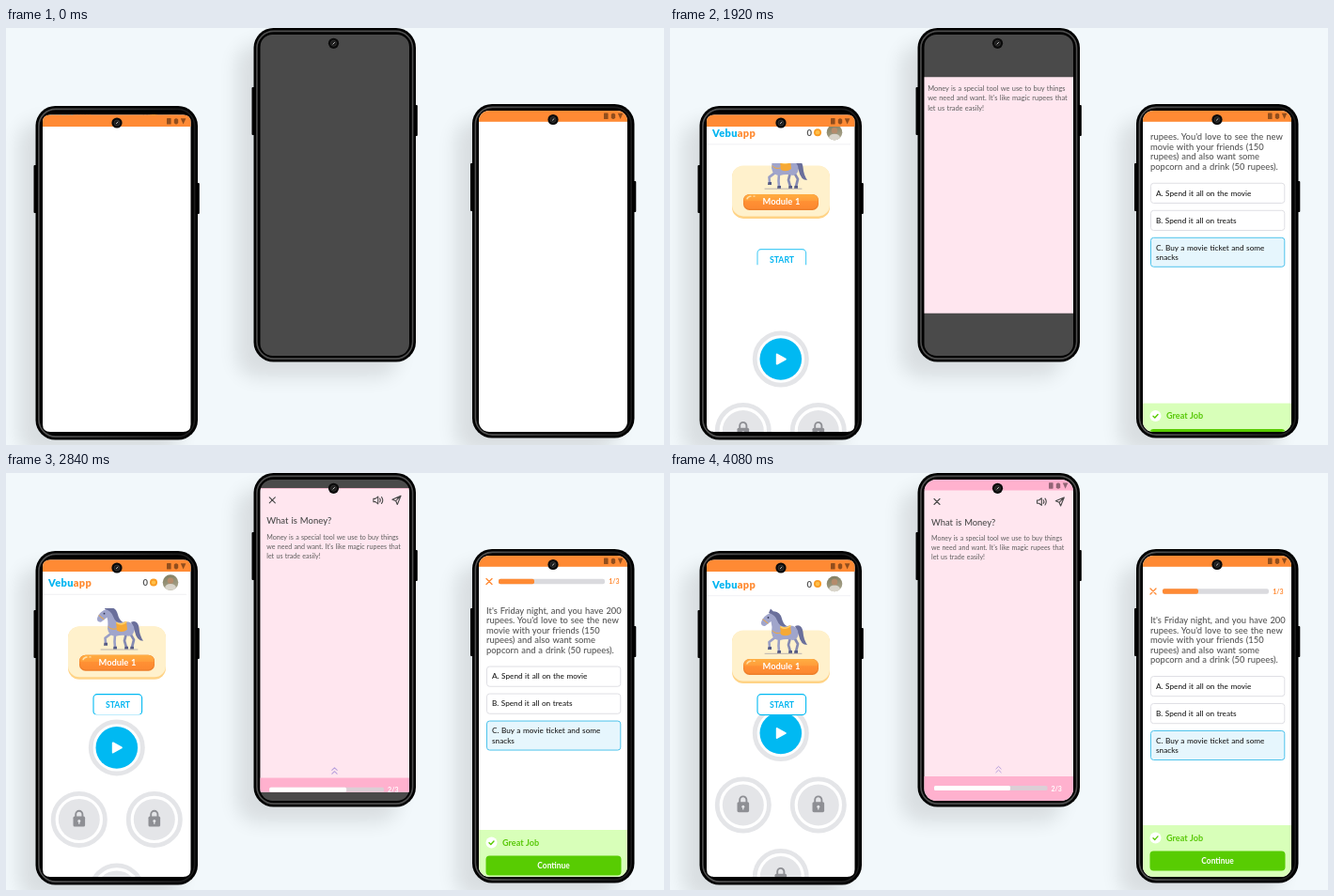
These frames come from a looping animation (700 px wide and 444 px high, 5.04 s). An HTML page:

```html
<!DOCTYPE html>
<html lang="en">
<head>
<meta charset="utf-8">
<title>Learning app screens</title>
<style>
  html, body { margin: 0; width: 100%; height: 100%; overflow: hidden; background: #f2f8fb; }
  svg { display: block; width: 700px; height: 444px; }
  text { font-family: Lato, "Open Sans", sans-serif; word-spacing: .06em; }
  .bold { font-weight: 700; }
  .logo { font-size: 11px; font-weight: 900; letter-spacing: .35px; }
  .line { fill: none; stroke-linecap: round; stroke-linejoin: round; }
  .shadow { fill: #000; opacity: .1; filter: url(#soft); }
</style>
</head>
<body>
<svg viewBox="0 0 700 444" xmlns="http://www.w3.org/2000/svg">
  <defs>
    <filter id="soft" x="-30%" y="-20%" width="160%" height="140%"><feGaussianBlur stdDeviation="10"/></filter>
    <linearGradient id="rim"><stop offset=".1" stop-color="#505050"/><stop offset=".9" stop-color="#1c1c1c"/></linearGradient>
    <linearGradient id="pill" x2="0" y2="1">
      <stop offset="0" stop-color="#ffae42"/><stop offset=".45" stop-color="#ff9d3a"/>
      <stop offset=".5" stop-color="#ff9034"/><stop offset="1" stop-color="#fc8830"/>
    </linearGradient>
    <linearGradient id="photo" x2=".3" y2="1">
      <stop offset="0" stop-color="#7d7a5c"/><stop offset="1" stop-color="#a9a48c"/>
    </linearGradient>
    <clipPath id="leftScreen"><path d="M39 105V100Q39 92.500 47 92.500H188.500Q196.500 92.500 196.500 100V422Q196.500 430 188.500 430H47Q39 430 39 422Z"/></clipPath>
    <clipPath id="midScreen"><rect x="270.500" y="7" width="158.500" height="342" rx="13"/></clipPath>
    <clipPath id="rightScreen"><rect x="503" y="88" width="158" height="342" rx="11"/></clipPath>
    <clipPath id="cardClip"><rect x="39" y="144" width="158" height="90"/></clipPath>
    <clipPath id="startClip"><rect id="startMask" x="90" y="235" width="58" height="0"/></clipPath>
    <clipPath id="pageClip"><rect id="pageMask" x="270" y="178" width="160" height="0"/></clipPath>
    <clipPath id="quizClip"><rect x="503" y="112" width="158" height="200"/></clipPath>

    <g id="status" fill="#000" opacity=".43">
      <rect width="4.600" height="6.500" rx=".6"/>
      <path d="M7.800 1.500Q10 -1 12.200 1.500V5Q10 8 7.800 5Z"/>
      <path d="M14.800 .3H20.400L17.600 6.500Z"/>
    </g>
    <g id="camera">
      <circle r="5.600" fill="#0a0a0a"/>
      <circle r="3" fill="#1b1b1b" stroke="#3c3c3c" stroke-width=".7"/>
      <path class="line" d="M-.6 .7L1 -.8" stroke="#ddd" stroke-width=".9"/>
    </g>
    <g id="cross"><path class="line" d="M-3 -3L3 3M3 -3L-3 3"/></g>
    <g id="ring"><circle r="27.600" fill="#fff" stroke="#e4e5e8" stroke-width="4.800"/></g>
    <g id="lock">
      <use href="#ring"/>
      <circle r="22" fill="#e4e5e8"/>
      <path class="line" d="M-3.600 -3V-5.500A3.600 3.600 0 0 1 3.600 -5.500V-3" stroke="#8e8f94" stroke-width="1.900"/>
      <rect x="-6.300" y="-3.300" width="12.600" height="11" rx="1.600" fill="#8e8f94"/>
      <circle cy="1.700" r="1.500" fill="#e4e5e8"/>
      <rect x="-.6" y="2" width="1.200" height="3" fill="#e4e5e8"/>
    </g>
    <g id="horse">
      <path d="M133 163Q140 160 141.500 169Q142 177 146 183Q139 183 137 173Z" fill="#6a6f9b"/>
      <path class="line" d="M132 175L136 182L134 190M128 175L126 183L128 190" stroke="#858ab2" stroke-width="2.700"/>
      <path class="line" d="M112 175L105.500 180L106 186M116 176L115.500 184L116 190" stroke="#9a9fc6" stroke-width="2.600"/>
      <path d="M107 149Q113 145 116 152Q118 160 124 163Q133 161 136 168Q138 176 131 178Q124 176 117 178Q109 178 108 170Q109 163 107.500 158L101 163Q96.500 163 97 159Q99 152 107 149Z" fill="#a0a5cb"/>
      <path d="M105 149L107 144.500L110 147.500Q117 147 119 155Q120 160 124 163Q117 165 114 157Q112 151 105 149Z" fill="#6a6f9b"/>
      <path d="M117 163Q122 166 128 162L129 171Q124 175 118 172Z" fill="#f6a935"/>
      <path class="line" d="M118 164Q123 167 128 163" stroke="#ffd16a" stroke-width="1.500"/>
      <path class="line" d="M109 168Q112 172 118 170M99 156L104 160" stroke="#f6a935" stroke-width="1"/>
      <circle cx="104.500" cy="154" r=".9" fill="#343858"/>
      <path d="M104.500 185H108V188H104ZM114.500 189H118V192H114ZM126.500 189H130V192H126ZM132.500 189H136V192H132Z" fill="#555a84"/>
      <path class="line" d="M101 192.300H140" stroke="#b9b3ae" stroke-width="1"/>
    </g>
  </defs>

  <g id="bodies"></g>

  <!-- left: course map -->
  <g clip-path="url(#leftScreen)">
    <rect x="39" y="92" width="158" height="339" fill="#fff"/>
    <g id="header">
      <text class="logo" x="45" y="122.700" fill="#00b4f0">Vebu<tspan fill="#ff8b33">app</tspan></text>
      <text class="bold" x="145.500" y="121.500" font-size="9.500" fill="#555">0</text>
      <circle cx="157" cy="118" r="4" fill="#f99b22"/>
      <circle cx="157" cy="118" r="2.200" fill="#ffc04a"/>
      <circle cx="175" cy="118" r="8.300" fill="url(#photo)"/>
      <path d="M169 123.700Q170 119.500 175 119.500Q180 119.500 181 123.700A8.300 8.300 0 0 1 169 123.700Z" fill="#d9d5cb"/>
      <circle cx="175" cy="116" r="3.200" fill="#b58c6c"/>
      <path d="M39 130.700H192" stroke="#ececf0" stroke-width=".8"/>
    </g>
    <g clip-path="url(#cardClip)">
      <g id="card">
        <rect x="66" y="168" width="104" height="56" rx="12" fill="#ffd386"/>
        <rect x="66" y="167.500" width="104" height="54" rx="12" fill="#fff1cc"/>
        <use href="#horse"/>
        <rect x="78" y="198" width="80" height="17" rx="6.500" fill="#ee7f2a"/>
        <rect x="78.500" y="198" width="79" height="15.500" rx="6.500" fill="url(#pill)"/>
        <path class="line" d="M82 203Q83 200.500 86 200.300M89 200.200H90" stroke="#ffe0a8" stroke-width="1.400"/>
        <text class="bold" x="118.500" y="209" font-size="9.300" fill="#fff" text-anchor="middle">Module 1</text>
      </g>
    </g>
    <g id="path">
      <g transform="translate(117.800 277)">
        <use href="#ring"/>
        <circle r="22.300" fill="#00b9f2"/>
        <path d="M-4 -5L5 0L-4 5Z" fill="#fff" stroke="#fff" stroke-width="2" stroke-linejoin="round"/>
      </g>
      <use href="#lock" x="77.800" y="353.500"/>
      <use href="#lock" x="157.800" y="353.500"/>
      <use href="#lock" x="117.800" y="430"/>
    </g>
    <g clip-path="url(#startClip)">
      <rect x="93" y="235.600" width="51.600" height="22" rx="4" fill="#fff"/>
      <rect id="startEdge" x="93" y="235.600" width="51.600" height="22" rx="4" fill="none" stroke="#00b9f2" stroke-width="1.100"/>
      <text class="bold" x="119" y="249.700" font-size="8.700" fill="#00b4f0" text-anchor="middle">START</text>
    </g>
    <rect x="39" y="92" width="158" height="13" fill="#ff8a34"/>
    <use href="#status" x="171" y="96"/>
  </g>
  <use href="#camera" x="118" y="101"/>

  <!-- middle: lesson page -->
  <g clip-path="url(#midScreen)">
    <rect x="270" y="6" width="160" height="344" fill="#4a4a4a"/>
    <g clip-path="url(#pageClip)">
      <g id="page">
        <rect x="270" y="6" width="160" height="344" fill="#ffe6ef"/>
        <rect x="270" y="6" width="160" height="12.500" fill="#ffb1ce"/>
        <use href="#status" x="403" y="10.200"/>
        <g class="line" stroke="#4a4a4a" stroke-width="1.100">
          <use href="#cross" x="284" y="30.500"/>
          <path d="M390.500 29H392.500L395.300 26.800V34.400L392.500 32.200H390.500ZM397.200 28.800Q398.500 30.600 397.200 32.400M399 27.200Q401.500 30.600 399 34"/>
          <path d="M419.300 26L410.300 29.800L414 31.300L415.600 35ZM414 31.300L419.300 26"/>
        </g>
        <text x="278" y="55.500" font-size="9.400" font-weight="500" fill="#4a4a4a">What is Money?</text>
        <g id="lesson" font-size="7.050" fill="#5e5e5e"></g>
        <path class="line" d="M346.800 315L349.500 312.400L352.200 315M346.800 318.800L349.500 316.200L352.200 318.800" stroke="#b79fdd" stroke-width="1"/>
        <rect x="270" y="323" width="160" height="27" fill="#ffb1ce"/>
        <rect x="281" y="333" width="120.500" height="5" rx="1.500" fill="#dccfd6"/>
        <rect x="281" y="333" width="81" height="5" rx="1.500" fill="#fff"/>
        <text class="bold" x="405.500" y="338.500" font-size="7" fill="#fff">2/3</text>
      </g>
    </g>
  </g>
  <use href="#camera" x="348.500" y="16.300"/>

  <!-- right: quiz -->
  <g clip-path="url(#rightScreen)">
    <rect x="503" y="87" width="158" height="344" fill="#fff"/>
    <g clip-path="url(#quizClip)">
      <g id="quiz">
        <g stroke="#ff8a34" stroke-width="1.300"><use href="#cross" x="514" y="126"/></g>
        <rect x="524" y="123.300" width="113" height="5.400" rx="2" fill="#dadade"/>
        <rect x="524" y="123.300" width="38" height="5.400" rx="2" fill="#ff8a34"/>
        <text class="bold" x="641.300" y="128.600" font-size="7" fill="#ff8a34">1/3</text>
        <g id="question" font-size="9.400" font-weight="500" fill="#555"></g>
        <g fill="#fff" stroke="#dfdfe4" stroke-width="1">
          <rect x="511.500" y="216.500" width="142.300" height="21.200" rx="3"/>
          <rect x="511.500" y="245.500" width="142.300" height="21.200" rx="3"/>
          <rect x="511.500" y="274.500" width="142.300" height="31" rx="3" fill="#e6f6fd" stroke="#4fc3ec"/>
        </g>
        <g id="answers" font-size="8.200" font-weight="500" fill="#1c1c1c"></g>
      </g>
    </g>
    <g id="panel">
      <rect x="503" y="375" width="158" height="60" fill="#d8ffb9"/>
      <circle cx="516.500" cy="388.500" r="6" fill="#fff"/>
      <path class="line" d="M514 388.700L515.800 390.400L519 386.900" stroke="#58cc02" stroke-width="1.400"/>
      <text class="bold" x="528" y="391.700" font-size="9.100" fill="#58c808">Great Job</text>
      <rect x="510.500" y="402.500" width="144" height="21" rx="4" fill="#58cc02"/>
      <text class="bold" x="582.500" y="415.800" font-size="8.400" fill="#fff" text-anchor="middle">Continue</text>
    </g>
    <rect x="503" y="87" width="158" height="12.800" fill="#ff8a34"/>
    <use href="#status" x="636" y="90.500"/>
  </g>
  <use href="#camera" x="582" y="97.500"/>
</svg>

<script>
  const $ = id => document.getElementById(id);

  // phone bodies: left edge, top edge, rim paint
  const body = ([x, y, rim]) => `<g transform="translate(${x} ${y})">
    <rect class="shadow" x="-18" y="17" width="172" height="355" rx="22"/>
    <rect x="-2" y="63" width="4" height="51" rx="1"/>
    <rect x="170" y="82" width="4.300" height="33" rx="1"/>
    <rect width="172.500" height="355.500" rx="21"/>
    <rect x="3.400" y="3.400" width="165.700" height="348.700" rx="18" fill="none" stroke="${rim}" stroke-width="1.600"/>
  </g>`;
  $('bodies').innerHTML = [
    [31.5, 83, 'url(#rim)'], [263.5, 0, '#4d4d4d'], [496, 81, 'url(#rim)']
  ].map(body).join('');

  const write = (id, x, rows) => {
    $(id).innerHTML = rows.map(([y, s]) => `<text x="${x}" y="${y}">${s}</text>`).join('');
  };
  write('lesson', 278, [
    [72.3, 'Money is a special tool we use to buy things'],
    [82.3, "we need and want. It's like magic rupees that"],
    [92.3, 'let us trade easily!']
  ]);
  write('question', 511, [
    [160, "It's Friday night, and you have 200"],
    [170.5, "rupees. You'd love to see the new"],
    [181, 'movie with your friends (150'],
    [191.5, 'rupees) and also want some'],
    [202, 'popcorn and a drink (50 rupees).']
  ]);
  write('answers', 517, [
    [229.8, 'A. Spend it all on the movie'],
    [258.8, 'B. Spend it all on treats'],
    [287.8, 'C. Buy a movie ticket and some'],
    [298, 'snacks']
  ]);

  const LOOP = 5040, START = 464, SPAN = 3600, TICK = 40;

  // cubic-bezier(.5, 0, 0, 1), solved by bisection
  function ease(x) {
    if (x <= 0) return 0;
    if (x >= 1) return 1;
    let lo = 0, hi = 1;
    for (let i = 0; i < 30; i++) {
      const s = (lo + hi) / 2;
      if (1.5 * (1 - s) ** 2 * s + s ** 3 < x) lo = s; else hi = s;
    }
    return lo * lo * (3 - 2 * lo);
  }

  // vertical distance each group still has to travel at the start
  const slides = { header: -26, card: -80, path: 286, quiz: -194, panel: 93 };

  function draw(now) {
    const t = Math.floor((now % LOOP) / TICK) * TICK;
    const p = ease((t - START) / SPAN), rest = 1 - p;

    for (const id in slides) $(id).setAttribute('transform', `translate(0 ${slides[id] * rest})`);

    $('startMask').setAttribute('height', 23.4 * p);
    $('startEdge').setAttribute('opacity', Math.min(1, Math.max(0, (p - 0.5) * 3)));

    const half = 171 * p;
    $('pageMask').setAttribute('y', 178 - half);
    $('pageMask').setAttribute('height', 2 * half);
    $('page').setAttribute('transform', `translate(350 178) scale(${1 + 0.2 * rest}) translate(-350 -178)`);
  }

  const origin = performance.now();
  function tick() {
    draw(performance.now() - origin);
    requestAnimationFrame(tick);
  }
  tick();
</script>
</body>
</html>
```
